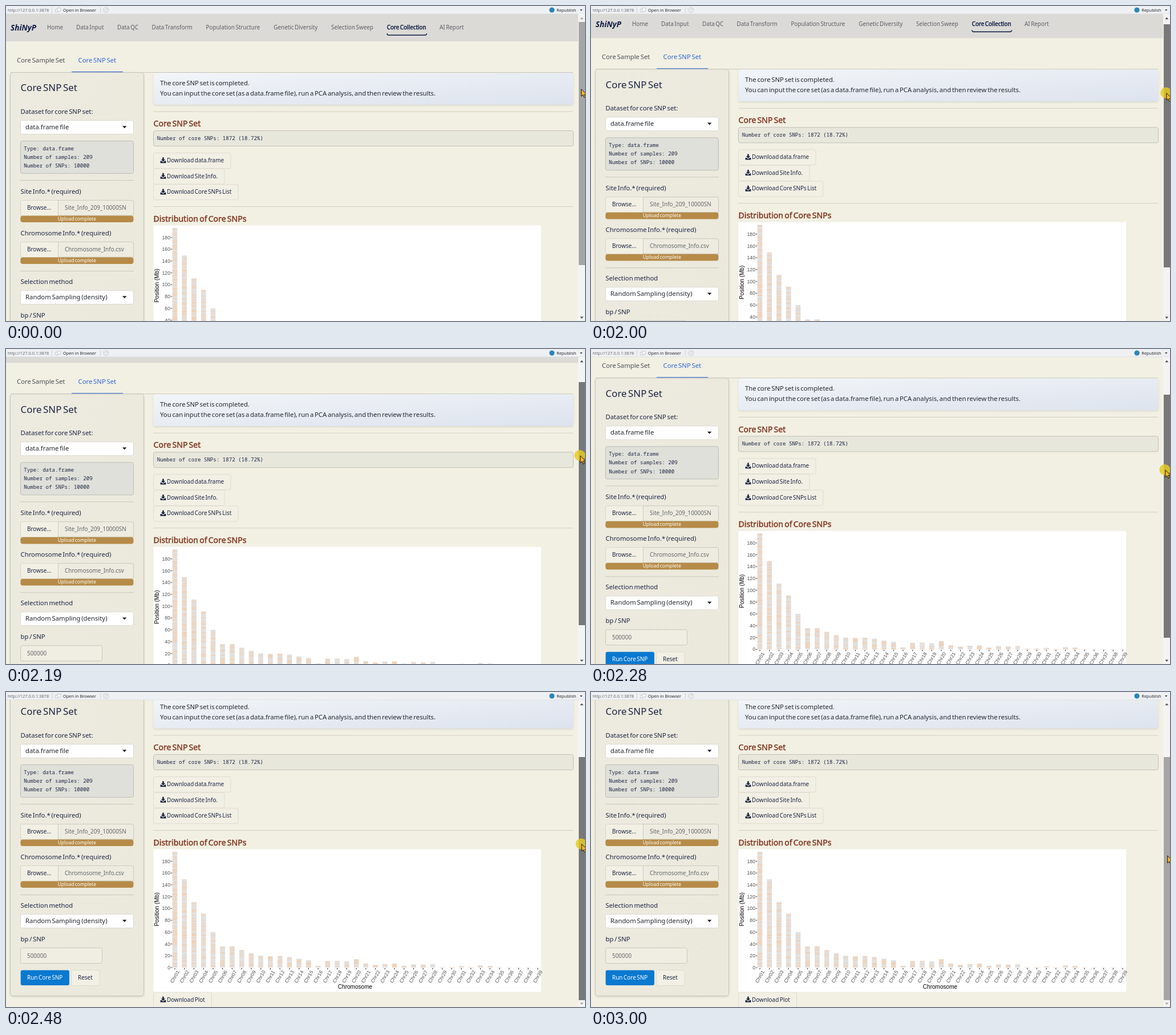
Recreate the animation shown at these times as an HTML page. Size 1015x552 px, loop 6310 ms.

```html
<!DOCTYPE html>
<html lang="en">
<head>
<meta charset="utf-8">
<title>Core SNP Set</title>
<style>
html, body { margin: 0; width: 100%; height: 100%; overflow: hidden; background: #f2f0e3; }
svg { display: block; width: 1015px; height: 552px; }
text { font-family: "Noto Sans", sans-serif; font-size: 9.95px; fill: #1b2444; word-spacing: -.11em; white-space: pre; }
.md { font-size: 11.33px; }
.lg { font-size: 16.9px; }
.ink { fill: #23272e; }
.head { font-size: 14.1px; fill: #7d3018; stroke: #7d3018; stroke-width: .4px; }
.nav { font-size: 9.9px; fill: #5c5e66; }
.on { fill: #0d1a44; stroke: #0d1a44; stroke-width: .4px; }
.dim { fill: #64676c; }
.up { font-size: 8.5px; fill: #fff; text-anchor: middle; }
.mono { font-family: "Noto Sans Mono", "Liberation Mono", monospace; font-size: 9.14px; word-spacing: 0; }
.bar { font-family: "Open Sans", sans-serif; font-size: 7.45px; fill: #1c1c1c; word-spacing: 0; }
.tick, .axis { font-family: "Liberation Sans", Arial, sans-serif; word-spacing: 0; }
.tick { font-size: 8.7px; fill: #4d4d4d; }
.axis { font-size: 10.05px; fill: #000; text-anchor: middle; }
.end { text-anchor: end; }
.mid { text-anchor: middle; }
.brand { font-size: 13.6px; font-weight: 700; font-style: italic; fill: #0f1b44; }
</style>
</head>
<body>
<svg id="stage" viewBox="0 0 1015 552">
  <defs>
    <linearGradient id="note" x1="0" y1="0" x2="1" y2="1">
      <stop offset="0" stop-color="#f2f5f8"/><stop offset="1" stop-color="#dde3ee"/>
    </linearGradient>
    <linearGradient id="panel" x1="0" y1="0" x2="1" y2="1">
      <stop offset="0" stop-color="#edebdf"/><stop offset="1" stop-color="#ebe9dc"/>
    </linearGradient>
    <filter id="shade" x="-10%" y="-20%" width="120%" height="150%">
      <feDropShadow dx="0" dy="1.4" stdDeviation="1.8" flood-color="#444" flood-opacity=".16"/>
    </filter>
  </defs>
  <rect width="1015" height="552" fill="#f2f0e3"/>
  <g id="page"></g>
  <g id="chrome"></g>
  <rect id="thumb" x="1004" y="28" width="11" height="426"/>
  <circle id="glow" r="9.6" fill="#e6cb22" opacity=".84"/>
  <path id="cursor" d="M0 0V12.6L3 9.9L5 14.6L7.2 13.6L5.2 9.2H9.2Z" fill="#fbb829" stroke="#1a1408" stroke-width="1" stroke-linejoin="round"/>
</svg>
<script>
const $ = id => document.getElementById(id);
const NS = "http://www.w3.org/2000/svg";
let layer;

function add(tag, attrs, content) {
  const el = document.createElementNS(NS, tag);
  for (const k in attrs) el.setAttribute(k, attrs[k]);
  if (content !== undefined) el.textContent = content;
  layer.append(el);
  return el;
}
const text = (x, y, s, cls = "", more = {}) => add("text", { x, y, class: cls, ...more }, s);
const box = (x, y, r, b, fill, stroke = "none", rx = 0, more = {}) =>
  add("rect", { x, y, width: r - x, height: b - y, fill, stroke, rx, ...more });
const path = (d, fill, stroke = "none", width = 1) => add("path", { d, fill, stroke, "stroke-width": width });
const rule = (x, r, y, color = "#d3d0c3") => box(x, y, r, y + 1, color);

function select(y, label) {
  box(25.5, y + .5, 223.5, y + 24.5, "#fff", "#dbd9ce", 3);
  text(34, y + 16, label, "md ink");
  path(`M204 ${y + 10.3}h7.4l-3.7 4z`, "#1b1b1b");
}

function fileInput(y, name) {
  box(25.5, y + .5, 223.5, y + 27, "#efede1", "#d6d4c8", 3);
  box(26, y + 1, 91.5, y + 27, "#f2f0e4", "none", 3);
  path(`M91.5 ${y + .5}H220.5a3 3 0 0 1 3 3V${y + 27}H91.5z`, "#eeece0", "#cbcabf");
  text(37, y + 17, "Browse...");
  text(103, y + 17, name, "dim");
  box(25.4, y + 27.4, 223.5, y + 39.1, "#b68b48", "none", 4);
  text(124.3, y + 36, "Upload complete", "up");
}

function download(y, right, label) {
  box(258.5, y + .5, right, y + 27.5, "#f2f0e4", "#dfdccf", 3);
  const m = y + 9;
  path(`M274.2 ${m - .8}h2.6v3.6h2.4l-3.7 3.9l-3.7-3.9h2.4z`, "#1b2444");
  path(`M270.6 ${m + 5.6}h2.2l2.7 2.4l2.7-2.4h2.2v3.6h-9.8z`, "#1b2444");
  text(282, y + 17, label);
}

function drawNav() {
  box(0, 14, 1003, 62, "#dbdad6");
  text(8, 42.5, "ShiNyP", "brand");
  const items = [[72, "Home"], [123, "Data Input"], [195, "Data QC"], [255.5, "Data Transform"],
    [350.5, "Population Structure"], [469.3, "Genetic Diversity"], [570, "Selection Sweep"],
    [667.7, "Core Collection"], [760, "AI Report"]];
  for (const [x, s] of items) text(x, 41, s, s === "Core Collection" ? "nav on" : "nav");
  path("M668 48q0 3 3 3h63.5q3 0 3-3", "none", "#0d1a44", 1.4);
  text(19, 99, "Core Sample Set", "md", { style: "fill:#4c4f57" });
  text(126.5, 99, "Core SNP Set", "md", { style: "fill:#2f66d8" });
  rule(8, 994, 116, "#c9c7ba");
  box(115, 114.8, 205, 116.4, "#3d6fd8");
}

function drawSide() {
  box(7.5, 116.5, 241.5, 641.5, "url(#panel)", "#c6c5b9", 5, { filter: "url(#shade)" });
  text(25.5, 149.3, "Core SNP Set", "lg");
  text(25.5, 189, "Dataset for core SNP set:", "md");
  select(200, "data.frame file");
  box(25.5, 236.5, 223.5, 293.5, "#e0e0da", "#bcbeb9", 3);
  ["Type: data.frame", "Number of samples: 209", "Number of SNPs: 10000"]
    .forEach((s, i) => text(31.3, 253 + 15.1 * i, s, "mono"));
  rule(25, 224, 305, "#c9c7bb");
  text(25.5, 329, "Site Info.* (required)", "md");
  fileInput(340, "Site_Info_209_10000SN");
  text(25.5, 402, "Chromosome Info.* (required)", "md");
  fileInput(413, "Chromosome_Info.csv");
  rule(25, 224, 464, "#c9c7bb");
  text(25.5, 487, "Selection method", "md");
  select(498, "Random Sampling (density)");
  text(25.5, 546, "bp / SNP", "md");
  box(25.5, 557.5, 168.5, 584.5, "#f0eee2", "#c9c8bd", 3);
  text(37, 574.5, "500000", "dim");
  box(25.7, 596.4, 111, 623.1, "#0a79d0", "none", 3);
  text(37, 613, "Run Core SNP", "", { style: "fill:#fff" });
  box(114.5, 596.5, 164, 623.5, "#f2f0e4", "#dfdccf", 3);
  text(126, 613, "Reset");
}

function drawMain() {
  box(258.5, 117, 994.5, 172.8, "url(#note)", "none", 4, { filter: "url(#shade)" });
  text(270, 139, "The core SNP set is completed.", "md ink");
  text(270, 157, "You can input the core set (as a data.frame file), run a PCA analysis, and then review the results.", "md ink");
  rule(258, 994, 184.5);
  text(258.5, 211.2, "Core SNP Set", "head");
  box(258.5, 218.5, 994.5, 245.5, "#e8e7dc", "#bfc1ba", 3);
  text(264.8, 235, "Number of core SNPs: 1872 (18.72%)", "mono");
  download(257, 394, "Download data.frame");
  download(284.6, 383, "Download Site Info.");
  download(312.2, 407, "Download Core SNPs List");
  rule(258, 994, 351);
  text(258.5, 377.7, "Distribution of Core SNPs", "head");
  download(634.5, 360.5, "Download Plot");
}

function drawPlot() {
  const zero = 592, unit = 1.0365;
  box(258.5, 384.5, 938, 634.5, "#fff");
  for (let v = 0; v <= 180; v += 20) {
    const y = zero - v * unit;
    text(288, y + 3.1, v, "tick end");
    box(289, y - .5, 291.3, y + .5, "#333");
  }
  text(0, 0, "Position (Mb)", "axis", { transform: "translate(268 490) rotate(-90)" });
  text(612, 628.8, "Chromosome", "axis");

  let seed = 11;
  const rnd = () => (seed = seed * 16807 % 2147483647) / 2147483647;
  const mix = (a, b, k) => Math.round(a + (b - a) * k);
  const size = [196, 149, 111, 91, 60, 36, 36, 29.5, 24, 20, 19, 19.5, 18, 15, 12.5, 3, 11, 11.3,
    10.5, 14, 7, 4.5, 6, 6.5, 3, 5.5, 5, 5.5, 1, 1, 2.5, .6, 3.6, 3, .6, .6, .5, .5, .4];
  size.forEach((mb, i) => {
    const x = 296 + 16.74 * i, top = zero - mb * unit;
    box(x - 4.2, top, x + 4.2, zero, "#e2e1e0");
    // grey and peach bands of one to two pixels
    for (let y = top, h; y < zero - .5; y += h) {
      h = 1 + Math.round(rnd());
      const k = rnd() < .45 ? .15 * rnd() : .35 + .6 * rnd();
      box(x - 4.2, y, x + 4.2, Math.min(zero, y + h + .05),
        `rgb(${mix(225, 244, k)},${mix(226, 205, k)},${mix(227, 172, k)})`);
    }
    box(x - .6, zero + 1, x + .6, zero + 3, "#222");
    text(0, 3, "Chr" + String(i + 1).padStart(2, "0"), "tick mid",
      { transform: `translate(${x} 607.8) rotate(-60)` });
  });
}

function drawChrome() {
  box(0, 0, 1015, 14, "#eef0f4");
  box(0, 13.4, 1015, 14.2, "#dcdee2");
  text(3, 10, "http://127.0.0.1:3878", "bar", { style: "fill:#606266" });
  box(80, 2, 81, 12, "#cfd1d5");
  box(86.5, 5.5, 91, 10.5, "#f8f9fa", "#c2c6cc", .5);
  box(90, 3.5, 96, 9, "#fbfbfc", "#c2c6cc", .5);
  text(100, 10, "Open in Browser", "bar");
  box(165, 2, 166, 12, "#cfd1d5");
  add("circle", { cx: 175.3, cy: 7, r: 4.6, fill: "#f6f7f8", stroke: "#c6c9cd" });
  path("M177.3 5.6a2.4 2.4 0 1 0 .3 2.2M177.6 4.3v1.8h-1.8", "none", "#b4b7bb", .8);
  add("circle", { cx: 957, cy: 7, r: 4.6, fill: "#2b86b4" });
  text(965.3, 10, "Republish", "bar");
  path("M1006 6h4.6l-2.3 2.6z", "#333");
  box(1003, 14.2, 1015, 552, "#f4f4f3");
  upArrow = path("M1006.3 23.3h6l-3-3.5z", "#505050");
  downArrow = path("M1006.3 544.5h6l-3 3.5z", "#505050");
}

let upArrow, downArrow;
layer = $("page");
drawNav(); drawSide(); drawMain(); drawPlot();
layer = $("chrome");
drawChrome();

// time, scroll, pointer x, pointer y, button held
const steps = [
  [0, 0, 1008.5, 145.7, 0],
  [1580, 0, 1008.5, 145.7, 1],
  [2000, 5.7, 1008.8, 152.5, 1],
  [2090, 20, 1008, 168.5, 1],
  [2190, 37.7, 1006.8, 187, 1],
  [2280, 65.6, 1006.8, 212, 1],
  [2390, 104, 1008, 243, 1],
  [2480, 109, 1009.2, 266.5, 1],
  [2590, 109, 1010.4, 277, 1],
  [2690, 109, 1010.6, 287, 1],
  [3000, 109, 1010.6, 287, 0]
];
const LOOP = 6310, MAX = 109, TRAVEL = 86;
const start = performance.now();

function draw() {
  const t = Math.max(0, performance.now() - start) % LOOP;
  const [, scroll, x, y, held] = steps.findLast(s => s[0] <= t);
  $("page").setAttribute("transform", `translate(0 ${-scroll})`);
  $("thumb").setAttribute("y", 28 + Math.round(scroll / MAX * TRAVEL));
  $("thumb").setAttribute("fill", held ? "#787878" : "#a6a6a6");
  $("glow").setAttribute("cx", x - .9);
  $("glow").setAttribute("cy", y - .5);
  $("glow").setAttribute("visibility", held ? "visible" : "hidden");
  $("cursor").setAttribute("transform", `translate(${x} ${y})`);
  upArrow.setAttribute("fill", scroll > 0 ? "#505050" : "#a3a3a3");
  downArrow.setAttribute("fill", scroll < MAX ? "#505050" : "#a3a3a3");
  requestAnimationFrame(draw);
}
draw();
</script>
</body>
</html>
```
